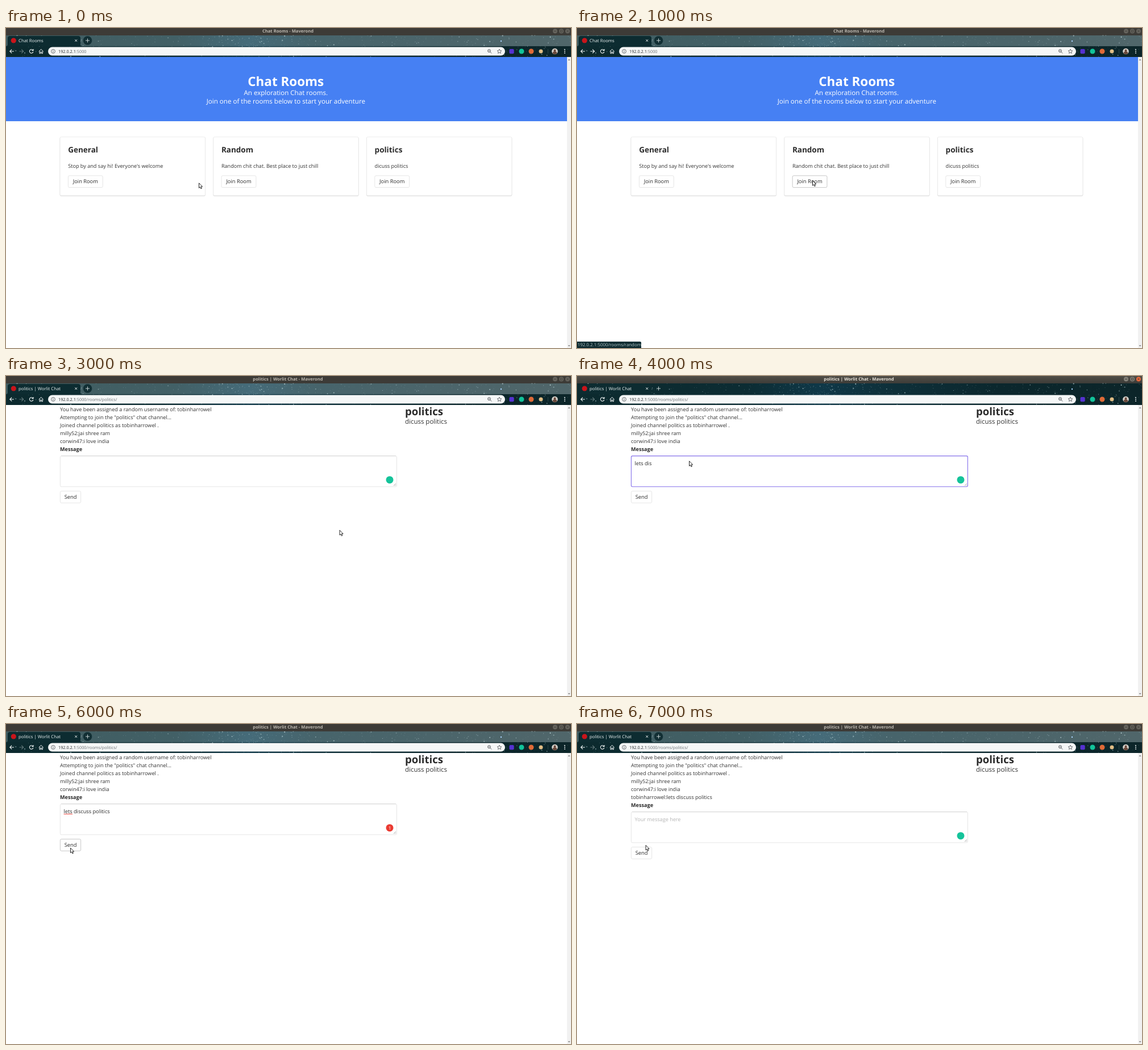
Write an HTML page that moves like this. It is 994x563 px and loops after 8000 ms.

```html
<!DOCTYPE html>
<html lang="en">
<head>
<meta charset="utf-8">
<title>Chat Rooms</title>
<style>
  html, body { margin: 0; width: 100%; height: 100%; overflow: hidden; background: #fff; }
  svg { display: block; width: 994px; height: 563px; }
  text { font-family: "Open Sans", "Noto Sans", sans-serif; text-rendering: geometricPrecision; white-space: pre; }
</style>
</head>
<body>
<svg id="stage" viewBox="0 0 994 563" xmlns="http://www.w3.org/2000/svg"></svg>
<script>
const stage = document.getElementById('stage');
const STEP = 1000;
const PAGE_TOP = 51;
const HOST = '192.0.2.1', PORT = ':5000';
const USER = 'tobinharrowel';
const DRAFT = 'lets discuss politics';
const INK = '#2b2b2b', BODY_INK = '#333';
const ROOMS = [
  ['General', "Stop by and say hi! Everyone's welcome"],
  ['Random', 'Random chit chat. Best place to just chill'],
  ['politics', 'dicuss politics'],
];

// One entry per second of the loop; hover is a room index or 'send'.
const scenes = [
  { page: 'lobby', cursor: [339, 272.3] },
  { page: 'lobby', cursor: [414, 268], hover: 1, forward: true },
  { page: 'lobby', cursor: [683, 267.8], hover: 2, forward: true },
  { page: 'room', cursor: [586.5, 270.8], draft: '' },
  { page: 'room', cursor: [197, 149.2], draft: DRAFT.slice(0, 8), focused: true },
  { page: 'room', cursor: [197, 149.2], draft: DRAFT, focused: true },
  { page: 'room', cursor: [113, 217.5], draft: DRAFT, hover: 'send' },
  { page: 'room', cursor: [120.5, 212.8], draft: '', sent: true },
];

const esc = s => s.replace(/&/g, '&amp;').replace(/</g, '&lt;');
const text = (x, y, size, fill, s, extra = '') =>
  `<text x="${x}" y="${y}" font-size="${size}" fill="${fill}" ${extra}>${esc(s)}</text>`;
const rect = (x, y, w, h, fill, extra = '') =>
  `<rect x="${x}" y="${y}" width="${w}" height="${h}" fill="${fill}" ${extra}/>`;
const circle = (x, y, r, fill, extra = '') =>
  `<circle cx="${x}" cy="${y}" r="${r}" fill="${fill}" ${extra}/>`;
const line = (d, color, width = 1) =>
  `<path d="${d}" fill="none" stroke="${color}" stroke-width="${width}"/>`;
const MIDDLE = 'text-anchor="middle"';
const BOLD = 'font-weight="700"';

function randomizer(seed) {
  return () => (seed = (seed * 16807) % 2147483647) / 2147483647;
}

// Stars lie evenly over the bar, with a denser band left of the middle.
function makeStars() {
  const random = randomizer(4711);
  let out = '';
  for (let i = 0; i < 750; i++) {
    const band = i % 4 === 0;
    const x = band ? 330 + (random() + random()) * 105 : random() * 994;
    const y = 13 + random() * 38;
    const size = 0.35 + random() ** 5 * 0.8;
    out += circle(x.toFixed(1), y.toFixed(1), size.toFixed(2), '#cfe6ea',
      `opacity="${(0.15 + random() * 0.55).toFixed(2)}"`);
  }
  return out + circle(871, 23, 1.2, '#a9d4ff');
}

function gradient(id, stops, vertical) {
  const marks = stops.map(([at, color]) => `<stop offset="${at}" stop-color="${color}"/>`).join('');
  return `<linearGradient id="${id}" ${vertical ? 'x2="0" y2="1"' : ''}>${marks}</linearGradient>`;
}

const stars = makeStars();
const defs = '<defs>'
  + gradient('sky', [[0, '#0c2a2e'], [.3, '#0c2c33'], [.43, '#0f3848'], [.55, '#0e303a'], [.75, '#0b272d'], [1, '#0c2529']])
  + gradient('haze', [[0, '#405c60'], [.3, '#426066'], [.43, '#456b79'], [.55, '#47646b'], [1, '#50666a']])
  + gradient('activeBar', [[0, '#504e48'], [1, '#3d3c38']], true)
  + '</defs>';

function windowButtons(focused) {
  const ink = focused ? '#35342f' : '#3c3b37';
  return [966, 977, 988].map((x, i) =>
    circle(x, 5.5, 4, focused ? (i === 2 ? '#ee6a3c' : '#85827a') : '#65635d')).join('')
    + line('M964 5.5h4M975.3 3.8h3.4v3.4h-3.4zM986.3 3.8l3.4 3.4m0-3.4l-3.4 3.4', ink, .8);
}

function browserFrame(s) {
  const focused = !!s.focused, room = s.page === 'room';
  const label = room ? 'politics | Worlit Chat' : 'Chat Rooms';
  const path = room ? '/rooms/politics/' : '';
  const white = '#f4f8f8', grey = '#4b4f53';
  return rect(0, 0, 994, 13, focused ? 'url(#activeBar)' : '#3d3b37')
    + text(496, 8.3, 7.6, focused ? '#e8e4db' : '#bcb8b0', label + ' - Maverond', `${BOLD} ${MIDDLE}`)
    + windowButtons(focused)
    + rect(0, 13, 994, PAGE_TOP - 13, 'url(#sky)')
    + (focused ? '' : rect(0, 13, 994, 19, 'url(#haze)'))
    + stars
    + '<path d="M0 32Q3 32 3 29V18Q3 14 7 14H127Q131 14 131 18V29Q131 32 134 32Z" fill="#0d2c31"/>'
    + circle(13.3, 22, 4.6, '#c9151b')
    + text(22, 24.7, 7.75, '#eef4f4', label)
    + line('M121.3 20.2l3.8 3.8m0-3.8l-3.8 3.8', white, .9)
    + (focused ? '' : circle(143.5, 22, 7.8, '#122f34'))
    + line('M140 22h7M143.5 18.5v7', '#d5dfdf', .9)
    + line('M14 41H7M10.2 37.6L6.8 41l3.4 3.4', white, 1.1)
    + line('M23.5 41h7M27.3 37.6L30.7 41l-3.4 3.4', s.forward ? white : '#64797c', 1.1)
    + line('M47.3 39A3.3 3.3 0 1 0 47.8 42M48 37v2.8h-2.8', white, 1.1)
    + line('M57.8 41.2L61.7 37.4l3.9 3.8M59 40.5v4.3h1.8v-2.6h1.8v2.6h1.8v-4.3', white, 1)
    + rect(74, 33.5, 804, 15, '#f5f7f7', 'rx="7.5"')
    + circle(83, 41, 3.4, 'none', `stroke="${grey}" stroke-width=".8"`)
    + line('M83 40.4v2.5M83 38.8v.9', grey, .8)
    + `<text x="92" y="43.7" font-size="7.3" fill="#202427">${HOST}<tspan fill="#6b7074">${PORT}${path}</tspan></text>`
    + circle(850, 40.2, 2.5, 'none', `stroke="${grey}" stroke-width=".9"`)
    + line('M851.9 42.1l2.4 2.4M848.8 40.2h2.4', grey, .9)
    + line('M868 37.2l1.1 2.5 2.7.3-2 1.8.6 2.7-2.4-1.4-2.4 1.4.6-2.7-2-1.8 2.7-.3z', grey, .8)
    + rect(885.5, 37, 8.2, 8.2, '#5532d1', 'rx="2"')
    + circle(907, 41, 4.5, '#12c39a')
    + circle(924, 41, 4.5, '#df6a37')
    + circle(941, 41, 3.5, '#e0bd86')
    + rect(953, 37, .7, 8, '#3d5657')
    + circle(965.5, 41, 5.3, '#d3cfc9')
    + '<circle cx="965.5" cy="39.4" r="2" fill="#69483b"/><path d="M961.7 44.6a3.8 3.6 0 0 1 7.6 0a5.3 5.3 0 0 1-7.6 0" fill="#69483b"/>'
    + [38, 41, 44].map(y => circle(983, y, .9, white)).join('');
}

function button(x, y, w, label, hovered) {
  return rect(x, y, w, 20.8, '#fff', `rx="2.2" stroke="${hovered ? '#b0b0b0' : '#dbdbdb'}" stroke-width=".7"`)
    + text(x + w / 2, y + 13.5, 9.3, INK, label, MIDDLE);
}

function card([name, blurb], i, hover) {
  const x = 95 + i * 269.7;
  return rect(x - .4, 192.2, 256.3, 103.8, '#dcdcdc', 'rx="2.4"')
    + rect(x, 191.7, 255.5, 103.2, '#fff', 'rx="2.2" stroke="#e5e5e5" stroke-width=".7"')
    + text(x + 14.2, 219, 13.5, INK, name, BOLD)
    + text(x + 14.2, 245.8, 9.12, BODY_INK, blurb)
    + button(x + 14.4, 259.8, 60.8, 'Join Room', hover === i);
}

function lobby(s) {
  const status = s.hover === undefined ? '' :
    rect(-3, 551.8, 116, 14, '#0d2a2f', 'rx="2"')
    + text(1, 560.2, 7.88, '#b3c6c7', `${HOST}${PORT}/rooms/${ROOMS[s.hover][0].toLowerCase()}`);
  return rect(0, PAGE_TOP, 987, 164 - PAGE_TOP, '#4680f3')
    + text(492.3, 102, 22.45, '#fff', 'Chat Rooms', `${BOLD} ${MIDDLE}`)
    + text(492.3, 118, 11.58, '#fff', 'An exploration Chat rooms.', MIDDLE)
    + text(492.3, 132.5, 11.58, '#fff', 'Join one of the rooms below to start your adventure', MIDDLE)
    + ROOMS.map((room, i) => card(room, i, s.hover)).join('')
    + status;
}

function messageBox(s, y) {
  const border = s.focused ? '#8570ea' : '#dbdbdb';
  const flagged = s.draft === DRAFT;
  return rect(95.4, y, 592, 54.2, '#fff', `rx="2.2" stroke="${border}" stroke-width="${s.focused ? 1.1 : .7}"`)
    + (s.focused ? '' : line(`M97 ${y}H686`, '#cdcdcd', .7))
    + (s.sent ? text(101.5, y + 16, 9.12, '#b5b5b5', 'Your message here') : '')
    + text(101.5, y + 16, 9.2, INK, s.draft)
    + (flagged ? rect(101.5, y + 17.4, 15.5, 1, '#ee5048') : '')
    + circle(675, y + 42.1, 6.5, flagged ? '#ea3b32' : '#15c39a')
    + (flagged ? text(675, y + 45.1, 8.2, '#fff', '1', MIDDLE) : '')
    + line(`M682 ${y + 52.5}l4-4M684.5 ${y + 52.5}l1.5-1.5`, '#8a8a8a', .7);
}

function room(s) {
  const lines = [
    `You have been assigned a random username of: ${USER}`,
    'Attempting to join the "politics" chat channel...',
    `Joined channel politics as ${USER} .`,
    'milly52:jai shree ram',
    'corwin47:i love india',
  ];
  if (s.sent) lines.push(`${USER}:${DRAFT}`);
  const end = 61.6 + lines.length * 14;
  return lines.map((l, i) => text(95, 61.6 + i * 14, 9.12, BODY_INK, l)).join('')
    + text(95, end, 9.12, INK, 'Message', BOLD)
    + messageBox(s, end + 9)
    + button(95.4, end + 70.9, 36.2, 'Send', s.hover === 'send')
    + text(702, 69, 18.55, INK, 'politics', BOLD)
    + text(702, 84, 11.47, BODY_INK, 'dicuss politics');
}

function scrollbar() {
  return rect(987, PAGE_TOP, 7, 563 - PAGE_TOP, '#f1f1f1')
    + '<path d="M988.6 57l2-2.4 2 2.4zM988.6 558l2 2.4 2-2.4z" fill="#8c8c8c"/>';
}

function pointer([x, y]) {
  return `<path transform="translate(${x} ${y})" d="M.5.5V9.2L2.5 7.4 3.9 10.5 5.4 9.8 4 6.8H6.6Z" fill="#fff" stroke="#111" stroke-width=".9"/>`;
}

let shown = -1;
function tick() {
  const index = Math.floor(performance.now() / STEP) % scenes.length;
  if (index !== shown) {
    shown = index;
    const s = scenes[index];
    stage.innerHTML = defs + rect(0, 0, 994, 563, '#fff') + browserFrame(s)
      + (s.page === 'lobby' ? lobby(s) : room(s)) + scrollbar() + pointer(s.cursor);
  }
  requestAnimationFrame(tick);
}
tick();
</script>
</body>
</html>
```
